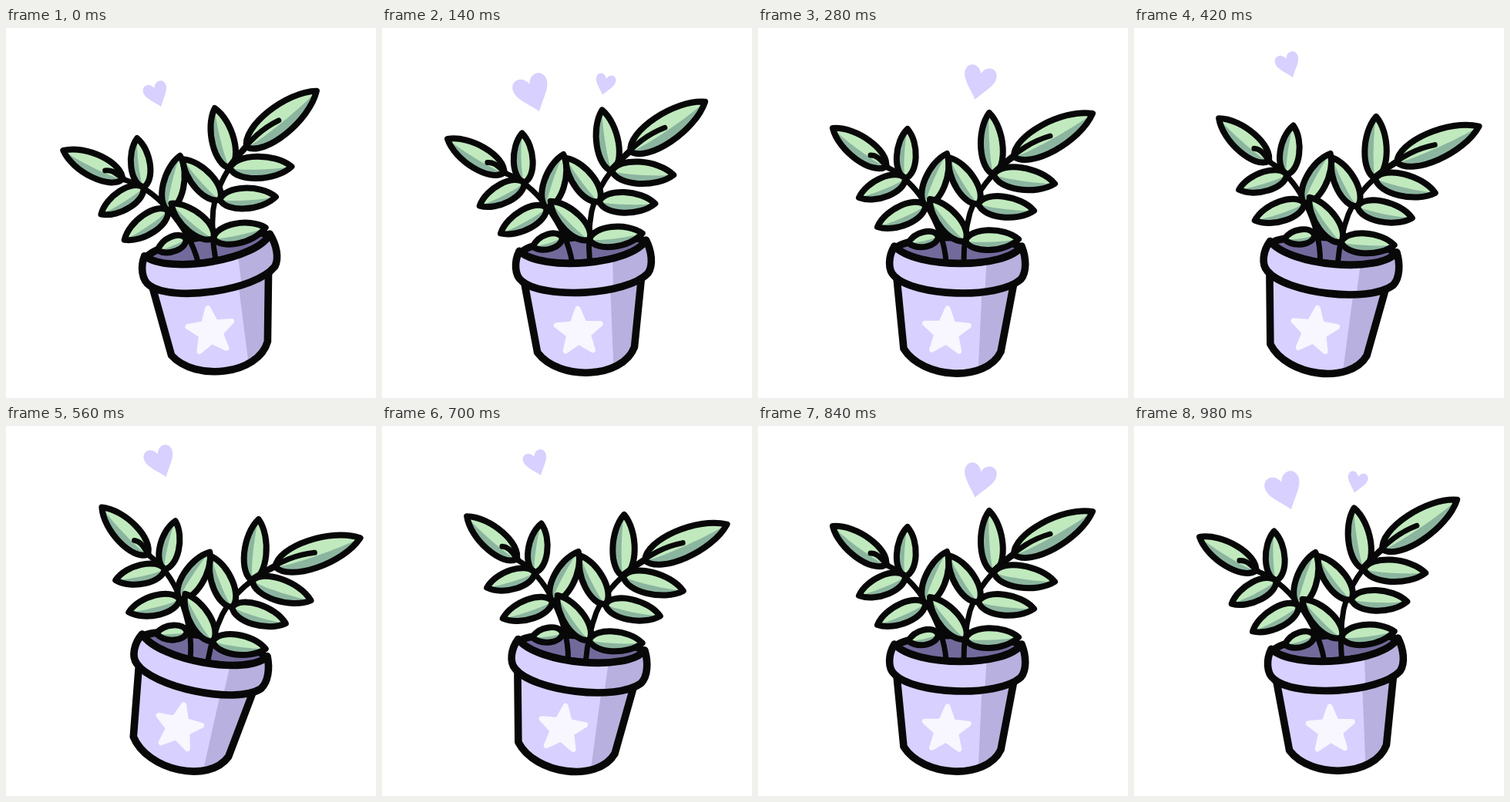
An HTML page for the animation above (1.12 s loop, 480 by 480 pixels).

```html
<!DOCTYPE html>
<html lang="en">
<head>
<meta charset="utf-8">
<title>Swaying plant</title>
<style>
  html, body { margin: 0; width: 100%; height: 100%; overflow: hidden; background: #fff; }
  svg { display: block; width: 100vw; height: 100vh; }
  .ink { stroke: #080808; stroke-linecap: round; stroke-linejoin: round; }
  .pot { stroke-width: 9.6; }
  .stem { fill: none; stroke-width: 7; }
  .leaf { fill: none; stroke-width: 8; }
  .lilac { fill: #d8d0ff; }
  .shade { fill: #b8b0de; }
</style>
</head>
<body>
<svg viewBox="0 0 480 480">
  <defs>
    <path id="body" d="M180 324 L189 416 C214 456 296 460 315 420 L331.500 333 Z"/>
    <path id="rim" d="M177 283 C169 296 168 314 177 322 C202 348 310 353 341 326 C349 316 348 298 342 283 C322 313 205 313 177 283 Z"/>
    <clipPath id="inBody"><use href="#body"/></clipPath>
    <clipPath id="inRim"><use href="#rim"/></clipPath>
  </defs>
  <g id="hearts"></g>
  <g id="plant">
    <ellipse class="ink pot" cx="260" cy="288.500" rx="82.500" ry="17" fill="#736a9c"/>
    <path class="ink stem" d="M166 180 C188 190 205 208 218 229 C232 252 242 276 244 303"/>
    <path class="ink stem" d="M332 167 C304 186 284 212 275 240 C269 262 267 284 267 303"/>
    <g id="leaves"></g>
    <path class="ink stem" d="M146 165 C156 165 160 173 168 180"/>
    <path class="ink stem" d="M379 140 C358 146 340 156 307 186"/>
    <use href="#body" class="lilac"/>
    <path class="shade" clip-path="url(#inBody)" d="M291 330 L285 460 H350 V320 Z"/>
    <use href="#body" class="ink pot" fill="none"/>
    <use href="#rim" class="lilac"/>
    <path class="shade" clip-path="url(#inRim)" d="M297 295 L294 350 H360 V280 Z"/>
    <use href="#rim" class="ink pot" fill="none"/>
    <polygon id="star" fill="#f8f6ff" stroke="#f8f6ff" stroke-width="7" stroke-linejoin="round"/>
  </g>
</svg>
<script>
  const STEP = 140, SWING = 4;

  // points on the stems, each with the tips of the leaves that grow there
  const NODES = [
    { at: [166, 180], tips: [[97, 130]] },
    { at: [191, 195], tips: [[194, 131], [131, 220]] },
    { at: [217, 230], tips: [[155, 258], [245, 163]] },
    { at: [234, 270], tips: [[195, 279]] },
    { at: [286, 228], tips: [[248, 168], [358, 237]] },
    { at: [306, 190], tips: [[300, 110], [385, 202]] },
    { at: [332, 167], tips: [[434, 111]] },
    { at: [269, 276], tips: [[338, 274], [223, 222]] }
  ];

  const $ = id => document.getElementById(id);
  const path = (d, attrs) => `<path d="${d}" ${attrs}/>`;

  function leaf([x1, y1], [x2, y2]) {
    const dx = x2 - x1, dy = y2 - y1, len = Math.hypot(dx, dy);
    const width = 5 + len * .115;
    // the dark side faces down and left
    const side = dy + dx * .7 > 0 ? 1 : -1;
    // control point at share t of the midrib, pushed out sideways
    const ctrl = (t, w) => {
      const k = side * w * 4 / 3 / len;
      return `${(x1 + dx * t - dy * k).toFixed(1)} ${(y1 + dy * t + dx * k).toFixed(1)}`;
    };
    const shape = w =>
      `M${x1} ${y1} C${ctrl(.27, -width)} ${ctrl(.9, -width)} ${x2} ${y2}` +
      ` C${ctrl(.9, w)} ${ctrl(.27, w)} ${x1} ${y1}Z`;
    return path(shape(width), 'fill="#8cb5a0"') +
      path(shape(width * .2), 'fill="#c0eabd"') +
      path(shape(width), 'class="ink leaf"');
  }

  const HEART = 'M0 .58C-.2 .3-.5 .05-.5-.2C-.5-.52-.12-.56 0-.24C.12-.56 .5-.52 .5-.2C.5 .05 .2 .3 0 .58Z';
  const heart = (x, y, size, tilt) =>
    path(HEART, `class="lilac" transform="translate(${x} ${y}) rotate(${tilt}) scale(${size})"`);

  // a left heart appears and grows, then a right one; the next left one is higher
  function hearts(pose) {
    const phase = pose % 3, round = Math.floor(pose / 3);
    const left = phase < 2
      ? heart(195 + 5 * round, 85 - 2 * phase - 38 * round, 31 + 15 * phase / (1 + round), -20) : '';
    const right = phase > 0 && !round
      ? heart(292 - 2.5 * phase, 75 - 3 * phase, 10 + 16 * phase, 13) : '';
    return left + right;
  }

  $('leaves').innerHTML = NODES.map(({ at, tips }) => tips.map(tip => leaf(tip, at)).join('')).join('');
  $('star').setAttribute('points', Array.from({ length: 10 }, (_, i) => {
    const r = i % 2 ? 13 : 30, a = (i * 36 - 87) * Math.PI / 180;
    return `${(244.5 + r * Math.cos(a)).toFixed(1)},${(394 + r * Math.sin(a)).toFixed(1)}`;
  }).join(' '));

  let shown = -1;
  function draw() {
    const step = Math.floor(performance.now() / STEP) % (2 * SWING);
    const pose = SWING - Math.abs(SWING - step);
    if (pose !== shown) {
      shown = pose;
      $('plant').setAttribute('transform', `rotate(${5 * pose - 10} 251 274)`);
      $('hearts').innerHTML = hearts(pose);
    }
    requestAnimationFrame(draw);
  }
  draw();
</script>
</body>
</html>
```
